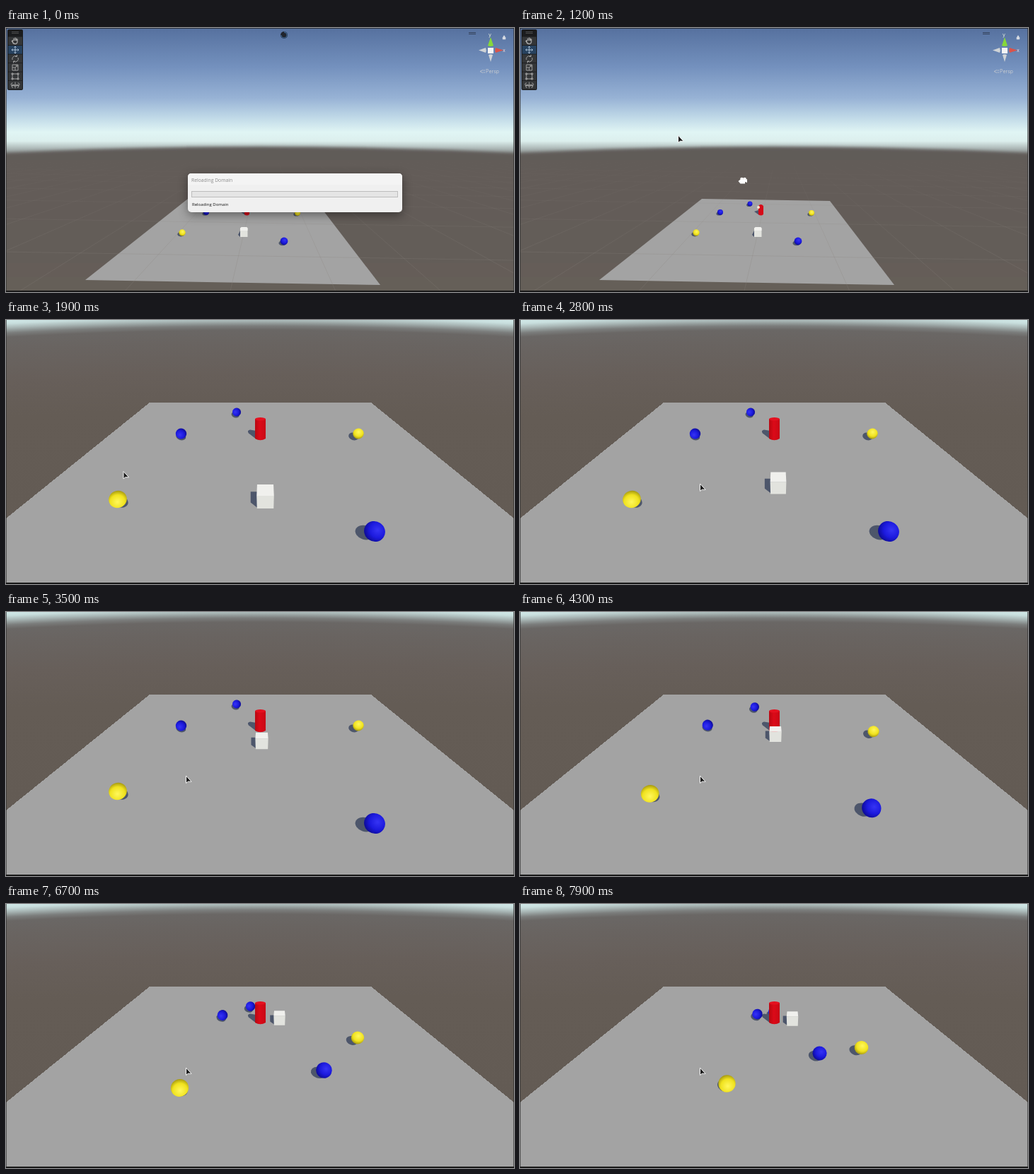
Recreate the animation shown at these times as an HTML page. Size 718x374 px, loop 8000 ms.

```html
<!DOCTYPE html>
<html lang="en">
<head>
<meta charset="utf-8">
<title>Scene preview</title>
<style>
  html, body { margin: 0; width: 100%; height: 100%; overflow: hidden; background: #1c1c1c; }
  svg { display: block; position: absolute; left: 0; top: 0; }
  .dialog { filter: drop-shadow(0 4px 7px rgba(0, 0, 0, .4)); }
  .ui { font-family: "Open Sans", "Noto Sans", sans-serif; font-size: 6.8px; }
  .label { font-family: Inter, Roboto, sans-serif; font-size: 7px; fill: #c6cad0; }
  .icon { fill: none; stroke: #a9a9a9; stroke-width: .9; }
  .busy { transform-origin: 0 0; animation: spin 1s linear infinite; }
  @keyframes spin { to { transform: rotate(360deg); } }
</style>
</head>
<body>
<svg width="718" height="374" viewBox="0 0 718 374">
  <defs>
    <linearGradient id="sky" x1="0" y1="0" x2="0" y2="180" gradientUnits="userSpaceOnUse">
      <stop offset="0" stop-color="#56719f"/>
      <stop offset=".3" stop-color="#7390bd"/>
      <stop offset=".55" stop-color="#97b2d5"/>
      <stop offset=".7" stop-color="#bfd8e7"/>
      <stop offset=".82" stop-color="#e0f5f4"/>
      <stop offset=".89" stop-color="#dcefed"/>
      <stop offset=".96" stop-color="#a3adac"/>
      <stop offset="1" stop-color="#858a89"/>
    </linearGradient>
    <linearGradient id="land" x1="0" y1="165" x2="0" y2="374" gradientUnits="userSpaceOnUse">
      <stop offset="0" stop-color="#605c5a"/>
      <stop offset=".25" stop-color="#645c58"/>
      <stop offset="1" stop-color="#655e59"/>
    </linearGradient>
    <!-- Curved horizon: rings from y = 280 (offset 0) up to y = -12 (offset 1) -->
    <radialGradient id="field" cx="359" cy="6454" r="6466" fr="6174" gradientUnits="userSpaceOnUse">
      <stop offset="0" stop-color="#635b54"/>
      <stop offset=".52" stop-color="#645c55"/>
      <stop offset=".7" stop-color="#675f5a"/>
      <stop offset=".85" stop-color="#696461"/>
      <stop offset=".91" stop-color="#6a6765"/>
      <stop offset=".93" stop-color="#7b7d7c"/>
      <stop offset=".955" stop-color="#a9b7b6"/>
      <stop offset=".975" stop-color="#c8dedd"/>
      <stop offset="1" stop-color="#d6efee"/>
    </radialGradient>
    <linearGradient id="line" x1="0" y1="185" x2="0" y2="320" gradientUnits="userSpaceOnUse">
      <stop offset="0" stop-color="#86807b" stop-opacity="0"/>
      <stop offset="1" stop-color="#86807b" stop-opacity=".32"/>
    </linearGradient>
    <radialGradient id="blue" cx=".58" cy=".36" r=".68">
      <stop offset="0" stop-color="#3634f4"/>
      <stop offset=".55" stop-color="#1c1ade"/>
      <stop offset="1" stop-color="#0c0a8e"/>
    </radialGradient>
    <radialGradient id="yellow" cx=".56" cy=".36" r=".68">
      <stop offset="0" stop-color="#fff75c"/>
      <stop offset=".6" stop-color="#f0e21e"/>
      <stop offset="1" stop-color="#9c9010"/>
    </radialGradient>
    <linearGradient id="red">
      <stop offset="0" stop-color="#b80812"/>
      <stop offset=".45" stop-color="#dc0a18"/>
      <stop offset="1" stop-color="#c80815"/>
    </linearGradient>
    <filter id="soft" x="-5%" y="-50%" width="110%" height="200%"><feGaussianBlur stdDeviation="2.2"/></filter>
    <clipPath id="ground"><path d="M0 182Q359 164 718 182V374H0Z"/></clipPath>
  </defs>

  <g id="editor">
    <rect width="718" height="374" fill="url(#sky)"/>
    <path d="M-20 178Q359 158 738 178V400H-20Z" fill="url(#land)" filter="url(#soft)"/>
    <path d="M257 242L438 245L529 364L112 357Z" fill="#a3a3a3"/>
    <g id="grid" clip-path="url(#ground)" stroke="url(#line)" stroke-width=".8"></g>
    <g id="minis"></g>
    <path d="M337 252V264Q340.500 267 344 264V252Q340.500 248 337 252Z" fill="#d60a18"/>
    <path d="M331 283.500L333 282H340L341.500 283.500V296H331Z" fill="#e2e3de"/>
    <path d="M331 283.500L333 282H340L341.500 283.500V287H331Z" fill="#f1f1ee"/>
    <circle cx="337" cy="254" r="2" fill="#f2e6d0"/>
    <g fill="#fff">
      <circle cx="313.500" cy="214" r="2.300"/><circle cx="317.500" cy="214" r="2.300"/>
      <path d="M311 215H318L321 214V219L318 218V220.500H311.500L308.500 217Z"/>
    </g>

    <rect x="2" y="2" width="22" height="86" rx="2" fill="#1b1c1e"/>
    <path d="M8 5.500H18M8 7.500H18" stroke="#4b4b4b"/>
    <g id="cells"></g>
    <g class="icon">
      <path d="M9.500 17V20Q10 22.500 13 22.500Q16 22.500 16 19V15.500M11 18V14.500M13 18V13.500M14.700 18V14.500M9.500 20L8 18" stroke-width="1.300"/>
      <path d="M8 31H18M13 26V36M9.500 29.500L8 31L9.500 32.500M16.500 29.500L18 31L16.500 32.500M11.500 27.500L13 26L14.500 27.500M11.500 34.500L13 36L14.500 34.500" stroke="#b9cde2"/>
      <path d="M9 45A4.300 4.300 0 0 1 15 40M17 42A4.300 4.300 0 0 1 11 47.500M15.500 38V40.500H13M10.500 49.500V47H13"/>
      <path d="M9 52H17V60H9ZM9 56H13V60M13 56L16 53M13.500 53H16V55.500"/>
      <path d="M9 65H17V72H9ZM8 64H10V66H8ZM16 64H18V66H16ZM8 71H10V73H8ZM16 71H18V73H16Z"/>
      <path d="M8 81H18M13 76.500V85.500M9.500 78A2 2 0 1 0 11 80.500M16.500 78A2 2 0 1 1 15 80.500M10 84.500A2 2 0 1 1 12 83M16 84.500A2 2 0 1 0 14 83"/>
    </g>

    <path d="M654 6.500H664M654 8.500H664" stroke="#35435c"/>
    <path d="M681 25L685 13L689 25Q685 27 681 25Z" fill="#86d83a"/>
    <path d="M692 28L703 31.500L692 35Q690.500 31.500 692 28Z" fill="#d9534a"/>
    <path d="M678 28L668 31.500L678 35Q679.500 31.500 678 28Z" fill="#cfd3d6"/>
    <path d="M682 38L685 48L688 38Q685 36.500 682 38Z" fill="#cfd3d6"/>
    <path d="M681 28H689V36H681Z" fill="#f4f4f4"/>
    <g class="label">
      <text x="682" y="12" fill="#e8f0e0">y</text>
      <text x="702" y="33.500" fill="#f0d8d6">x</text>
      <text x="678" y="64">Persp</text>
    </g>
    <path d="M674 59.500L670 61.500L674 63.500M674.500 60H677M674.500 63H677" fill="none" stroke="#c6cad0" stroke-width=".8"/>
    <path d="M702 13H706V16H702ZM703 13V11.500Q704 10 705 11.500V13" fill="#d5dae2" stroke="#d5dae2" stroke-width=".5"/>

    <g id="dialog" class="ui">
      <rect class="dialog" x="257" y="206" width="303" height="55" rx="5" fill="#f0f0f0"/>
      <path d="M257 222V211Q257 206 262 206H555Q560 206 560 211V222Z" fill="#f4f4f4"/>
      <rect x="262.500" y="231.500" width="291" height="8" fill="#e5e5e5" stroke="#bdbdbd"/>
      <text x="262" y="218" fill="#8c8c8c">Reloading Domain</text>
      <text x="263" y="252" fill="#111" style="font-size:6px">Reloading Domain</text>
    </g>
    <path d="M0 .5H718" stroke="#2b3340"/>
  </g>

  <g id="game">
    <rect width="718" height="374" fill="url(#field)"/>
    <path d="M203 117H516L718 281V374H0V281Z" fill="#a3a3a3" shape-rendering="crispEdges"/>
    <g id="shadows" fill="#4d566b">
      <path d="M354 169L343 160.500Q340 156.500 345 155.500L354 157Z"/>
    </g>
    <g id="actors">
      <g id="pillar">
        <path d="M352 140V168Q359.500 172.500 367 168V140Z" fill="url(#red)"/>
        <ellipse cx="359.500" cy="140.300" rx="7.500" ry="2.300" fill="#e4101f"/>
      </g>
    </g>
  </g>

  <path d="M.5 0V374M717.500 0V374" stroke="#2a2a2a" opacity=".6"/>
  <rect y="372" width="718" height="2" fill="#1a1a1a"/>
  <g id="cursor">
    <path id="arrow" d="M0 0V10.500L2.800 8.200L7.600 8.300Z" fill="#1c1c1c" stroke="#f4f4f4"/>
    <g id="wait">
      <circle r="5" fill="#20242c"/>
      <path class="busy" d="M0 -4A4 4 0 1 1 -4 0" fill="none" stroke="#3c628f" stroke-width="1.300"/>
    </g>
  </g>
</svg>

<script>
const LOOP = 8000, PLAY = 1900, DIALOG_END = 700;
const $ = id => document.getElementById(id);

function add(parent, tag, attrs = {}) {
  const el = document.createElementNS("http://www.w3.org/2000/svg", tag);
  set(el, attrs);
  return parent.appendChild(el);
}
function set(el, attrs) {
  for (const k in attrs) el.setAttribute(k, attrs[k]);
}
const show = (el, on) => { el.style.display = on ? "" : "none"; };

// Linear position along [time, x, y] keys.
function along(keys, t) {
  if (t <= keys[0][0]) return keys[0].slice(1);
  for (let i = 1; i < keys.length; i++) {
    const [t0, x0, y0] = keys[i - 1], [t1, x1, y1] = keys[i];
    if (t < t1) {
      const u = (t - t0) / (t1 - t0);
      return [x0 + (x1 - x0) * u, y0 + (y1 - y0) * u];
    }
  }
  return keys[keys.length - 1].slice(1);
}

// Perspective floor grid. The slight lean keeps upright lines paintable by the gradient.
for (let i = -14; i <= 14; i++) {
  add($("grid"), "line", { x1: 368, y1: 154, x2: 368 + (i * 140 - 48) * 1.07, y2: 374 });
}
for (let i = 0; i < 7; i++) {
  const y = 154 + 1 / (.00595 + i * .0023);
  add($("grid"), "line", { x1: 0, y1: y - 5, x2: 718, y2: y + 7 });
}

for (let i = 0; i < 6; i++) {
  add($("cells"), "rect", { x: 3, y: 12.5 + i * 12.5, width: 20, height: 11.7, fill: i === 1 ? "#27425f" : "#343638" });
}

const minis = [["blue", 325, 249, 3.5], ["blue", 283, 261, 4], ["yellow", 412, 262, 4], ["yellow", 249, 290, 4.7], ["blue", 393, 302, 5.4]];
for (const [color, x, y, r] of minis) {
  add($("minis"), "ellipse", { cx: x - r * .4, cy: y + r * .5, rx: r, ry: r * .65, fill: "#4d566b" });
  add($("minis"), "circle", { cx: x, cy: y, r, fill: `url(#${color})` });
}
add($("minis"), "path", { d: "M338 265L331 260L337 258ZM331 296L328 293L331 287Z", fill: "#4d566b" });

// Balls advance in turns, one leg per turn.
const turns = [[3750, 4650], [5450, 6250], [7200, 7900]];
const balls = [
  ["blue", [326, 130.5], [335.5, 137], [345.5, 145], [358, 153]],
  ["blue", [247.5, 161], [276.5, 159.5], [306, 157.5], [335.5, 156]],
  ["yellow", [498, 161], [500.5, 174.5], [497, 189.5], [482.5, 203.5]],
  ["yellow", [158, 254], [200, 259.5], [245.5, 260.5], [292.5, 254.5]],
  ["blue", [521, 299.5], [481.5, 264], [449.5, 235.5], [423.5, 211.5]]
].map(([color, ...stops]) => ({
  keys: turns.flatMap(([a, b], i) => [[a, ...stops[i]], [b, ...stops[i + 1]]]),
  shade: add($("shadows"), "ellipse"),
  el: add($("actors"), "ellipse", { fill: `url(#${color})` })
}));

const cube = {
  keys: [[2550, 366.5, 250], [2700, 365.5, 238], [3500, 361.5, 182.5], [3650, 361, 173],
         [4600, 361, 173], [4850, 347, 167], [5300, 345, 154], [5400, 347, 153.5],
         [6350, 354, 153.5], [6500, 369, 154], [6700, 386.5, 161.5], [7200, 385, 162.5]],
  shade: add($("shadows"), "path"),
  el: add($("actors"), "g")
};
const front = add(cube.el, "path", { fill: "#e2e3de" });
const lid = add(cube.el, "path", { fill: "#f0f0ed" });

const pillar = { el: $("pillar"), foot: 170 };
const actors = [...balls, cube, pillar];

const mouse = [[200, 393, 10], [900, 270, 112], [1700, 146.5, 218.5], [1850, 146.5, 218.5],
               [1851, 166, 214.5], [1950, 166, 214.5], [2650, 254.5, 232]];

function placeBall(b, t) {
  const [x, y] = along(b.keys, t);
  const r = 6 + (y - 130) * .049;
  const dx = x - 359, dy = y - 190;
  const stretch = 1 + .2 * (dx * dx + dy * dy) / 359 ** 2;
  const turn = Math.atan2(dy, dx) * 180 / Math.PI;
  set(b.el, { rx: r * stretch, ry: r, transform: `translate(${x} ${y}) rotate(${turn})` });
  const sx = x - r * (.42 + dx / 359 * 1.25);
  const sy = y + r * (.62 - (y - 130) * .003);
  set(b.shade, { rx: r * .95, ry: r * .7, transform: `translate(${sx} ${sy}) rotate(18)` });
  b.foot = y + r;
}

function placeCube(t) {
  const [x, y] = along(cube.keys, t);
  const far = 250 - y;
  const w = (24.5 - far * .092) / 2, h = (34 - far * .155) / 2;
  const top = y - h, base = y + h, edge = top + 2 * h * (.47 - far * .0015);
  set(front, { d: `M${x - w} ${edge}H${x + w}L${x + w - .5} ${base}H${x - w + .5}Z` });
  set(lid, { d: `M${x - w + .7} ${top}H${x + w - .7}L${x + w} ${edge}H${x - w}Z` });
  set(cube.shade, { d: `M${x - w + 1} ${base - 1}L${x - w - h * .5} ${base - h * .5}V${y - h * .4}L${x - w + 1} ${y - h * .4}Z` });
  cube.foot = base;
}

function draw() {
  const t = performance.now() % LOOP;
  const playing = t >= PLAY;
  show($("editor"), !playing);
  show($("game"), playing);
  show($("dialog"), t < DIALOG_END);
  show($("wait"), t < DIALOG_END);
  show($("arrow"), t >= DIALOG_END);

  const [mx, my] = along(mouse, playing ? t : Math.min(t, 1850));
  set($("cursor"), { transform: `translate(${mx} ${my})` });

  if (playing) {
    balls.forEach(b => placeBall(b, t));
    placeCube(t);
    // Nearer objects cover farther ones.
    actors.sort((a, b) => a.foot - b.foot).forEach(a => $("actors").appendChild(a.el));
  }
  requestAnimationFrame(draw);
}
draw();
</script>
</body>
</html>
```
